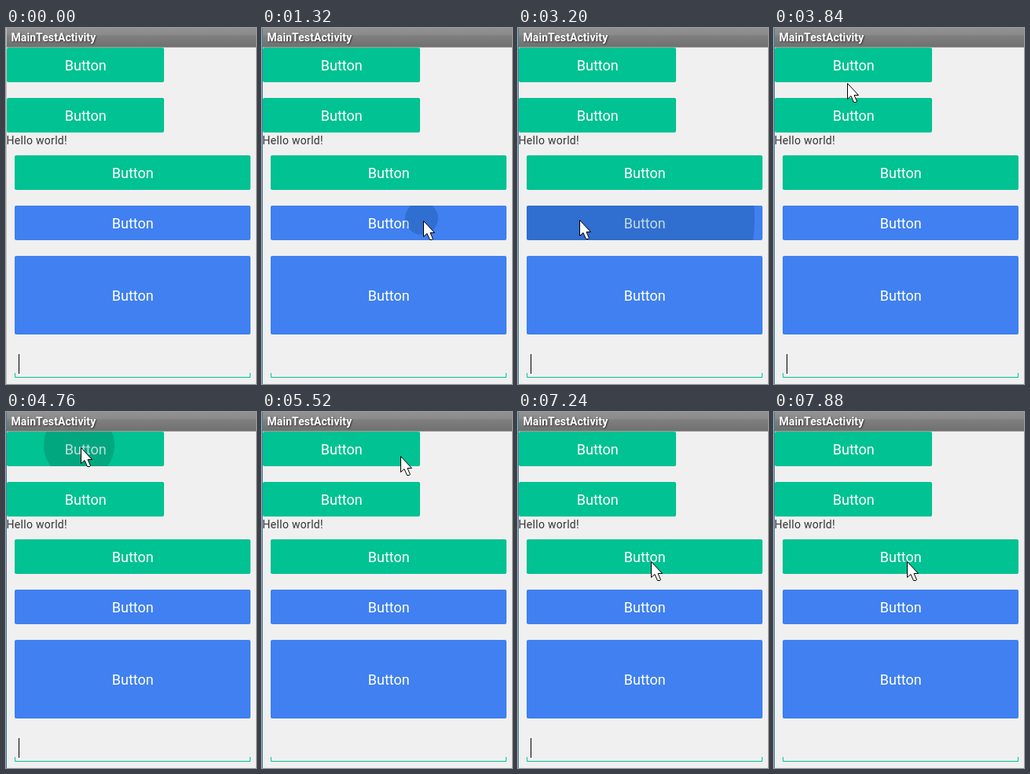
An HTML page for the animation above (8000 ms loop, 318 by 453 pixels).

```html
<!DOCTYPE html>
<html lang="en">
<head>
<meta charset="utf-8">
<title>Button ripples</title>
<style>
  html, body { margin: 0; width: 100%; height: 100%; overflow: hidden; background: #f0f0f0; }
  svg { display: block; }
  text { font-family: Roboto, sans-serif; font-size: 14px; }
  .label { font-size: 18px; fill: #fff; text-anchor: middle; }
  .title { font-weight: 700; fill: #fff; letter-spacing: .07px; text-shadow: 1px 1px 2px #333; }
  .hello { fill: #333; letter-spacing: .3px; }
  .ripple { fill: #bfdcdd; mix-blend-mode: multiply; }
</style>
</head>
<body>
<svg width="318" height="453" viewBox="0 0 318 453">
  <defs>
    <linearGradient id="bar" x2="0" y2="1">
      <stop offset="0" stop-color="#929292"/>
      <stop offset=".37" stop-color="#8a8a8a"/>
      <stop offset=".4" stop-color="#808080"/>
      <stop offset="1" stop-color="#707070"/>
    </linearGradient>
  </defs>
  <rect width="318" height="453" fill="#f0f0f0"/>
  <rect width="318" height="25" fill="#a0a0a0"/>
  <rect width="318" height="24" fill="url(#bar)"/>
  <text class="title" x="6.5" y="17">MainTestActivity</text>
  <text class="hello" x="0.5" y="148">Hello world!</text>
  <g id="buttons"></g>
  <path d="M11.5 439V444.5H310.5V439" fill="none" stroke="#00c292"/>
  <rect id="caret" x="16" y="415" width="1" height="25"/>
  <rect id="border" width="1" height="453"/>
  <path id="pointer" d="M.5 .5V20.5L5 16.5 8.5 24.5H11L12.5 23.5 9 15.5H14.5Z"
    fill="#fff" stroke="#000" stroke-miterlimit="1"/>
</svg>
<script>
const LOOP = 8000, STEP = 40;
const START_RADIUS = 5, GROWTH = .5; // px, px per ms
const $ = id => document.getElementById(id);

// Two narrow buttons, then three wide ones below the text line.
const buttons = Array.from({ length: 5 }, (_, i) => {
  const wide = i > 1;
  return {
    x: wide ? 11 : 1,
    y: 25 + 64 * i + (wide ? 9 : 0),
    w: wide ? 300 : 200,
    h: i === 4 ? 100 : 44,
    color: i < 3 ? '#00c292' : '#4080f0'
  };
});

const entry = { x: 289, y: 460 };
const moves = [
  { from: 240, to: 800, x: 205, y: 245 },
  { from: 1920, to: 1960, x: 194, y: 245 },
  { from: 2160, to: 2440, x: 78, y: 244 },
  { from: 3560, to: 3920, x: 95, y: 45 },
  { from: 5160, to: 5600, x: 184, y: 57 },
  { from: 6360, to: 6680, x: 249, y: 162 },
  { from: 6680, to: 7080, x: 169, y: 190 }
];

const clicks = [
  { button: 3, press: 1160, release: 1288, end: 1760 },
  { button: 3, press: 2600, release: 2760, end: 3240 },
  { button: 0, press: 3960, release: 4680, end: 5120 },
  { button: 0, press: 5880, release: 5920, end: 6320 },
  { button: 2, press: 7320, release: 7600, end: 7880 }
];

const clamp = k => Math.min(1, Math.max(0, k));
const ease = k => k * k * (3 - 2 * k);

function pointerAt(t) {
  return moves.reduce((p, move) => {
    const k = ease(clamp((t - move.from) / (move.to - move.from)));
    return { x: p.x + (move.x - p.x) * k, y: p.y + (move.y - p.y) * k };
  }, entry);
}

$('buttons').innerHTML = buttons.map(({ x, y, w, h, color }, i) => {
  const box = `<rect x="${x}" y="${y}" width="${w}" height="${h}" rx="2" fill="${color}"/>`;
  return `<clipPath id="clip${i}">${box}</clipPath>${box}
    <text class="label" x="${x + w / 2 + .3}" y="${y + h / 2 + 7}">Button</text>
    <g class="ripple" clip-path="url(#clip${i})"><circle id="ripple${i}"/></g>`;
}).join('');

function drawRipple(i, t) {
  const circle = $('ripple' + i);
  const click = clicks.find(c => c.button === i && t >= c.press && t < c.end);
  circle.setAttribute('r', click ? START_RADIUS + Math.max(0, t - click.release) * GROWTH : 0);
  if (!click) return;
  const { x, y } = pointerAt(click.press);
  circle.setAttribute('cx', x - 2);
  circle.setAttribute('cy', y - 3);
}

function draw(now) {
  const t = Math.floor(now % LOOP / STEP) * STEP;
  const { x, y } = pointerAt(t);
  $('pointer').setAttribute('transform', `translate(${Math.round(x)} ${Math.round(y)})`);
  $('caret').style.visibility = (t + 1020) % 1060 < 460 ? 'hidden' : 'visible';
  $('border').setAttribute('fill', t < 240 ? '#c0c0c0' : '#3f7fae');
  buttons.forEach((_, i) => drawRipple(i, t));
}

const start = performance.now();
function tick() {
  draw(performance.now() - start);
  requestAnimationFrame(tick);
}
tick();
</script>
</body>
</html>
```
